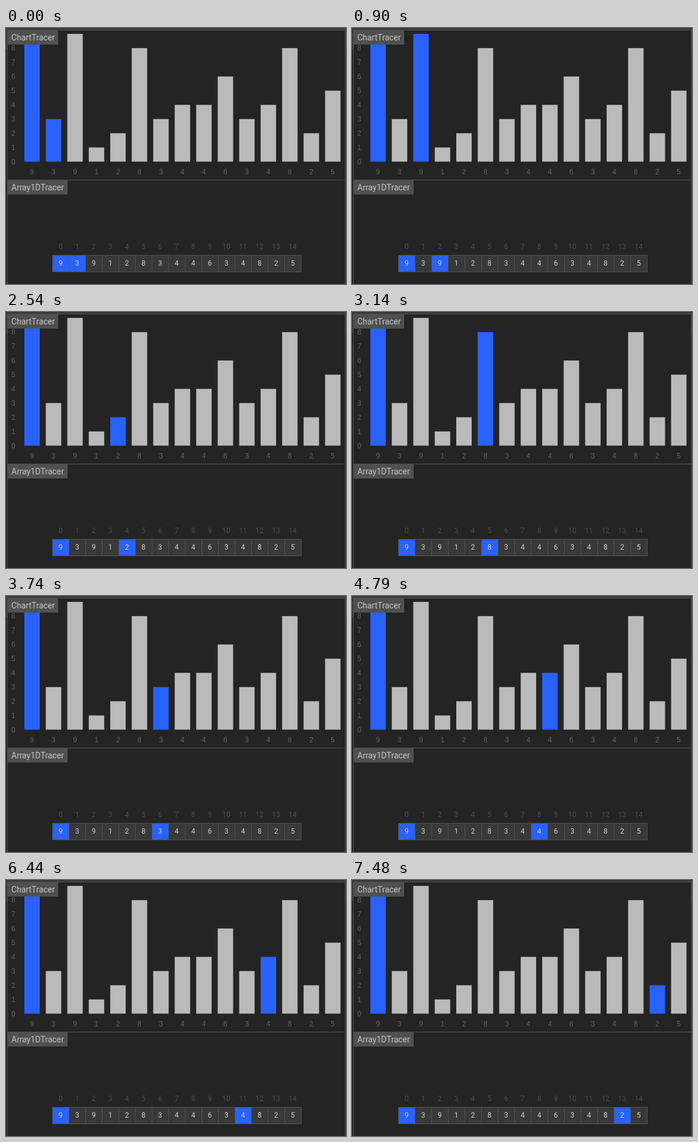
Recreate the animation shown at these times as an HTML page with a canvas. Size 574 px wide and 432 px high, loop 8000 ms.

```html
<!DOCTYPE html>
<html>
<head>
<meta charset="utf-8">
<style>
html, body { margin: 0; width: 574px; height: 432px; overflow: hidden; background: #242424; }
canvas { display: block; }
</style>
</head>
<body>
<canvas id="stage" width="574" height="432"></canvas>
<script>
const ctx = document.getElementById('stage').getContext('2d');
const LOOP = 8000;
const BLUE = '#2962ff', PINK = '#c51162', BAR = '#bababa';
const CELL = '#393939', LINE = '#505050';
const UI = 'Roboto, sans-serif';
const AXIS = '"Liberation Sans", Arial, sans-serif';
const data = [9, 3, 9, 1, 2, 8, 3, 4, 4, 6, 3, 4, 8, 2, 5];

// [start time, compared index, is it a new minimum]
const steps = [
  [0, 1], [450, 1, true], [900, 2], [1500, 3], [2100, 3, true],
  [2540, 4], [3140, 5], [3740, 6], [4190, 7], [4790, 8],
  [5390, 9], [5840, 10], [6440, 11], [7040, 12], [7480, 13]
];

function rect(x, y, w, h, color) {
  ctx.fillStyle = color;
  ctx.fillRect(x, y, w, h);
}

function text(str, x, y, size, color, family, align = 'center') {
  ctx.font = `${size}px ${family}`;
  ctx.textAlign = align;
  ctx.fillStyle = color;
  ctx.fillText(str, x, y);
}

function title(str, y, w) {
  rect(3, y, w, 24, LINE);
  text(str, 9, y + 17, 14, '#c6c6c6', UI, 'left');
}

function drawFrame() {
  rect(0, 0, 574, 432, '#242424');
  rect(0, 0, 574, 3, CELL);
  rect(0, 0, 2, 36, CELL);
  rect(573, 0, 1, 36, CELL);
  rect(2, 3, 571, 1, LINE);
  rect(2, 256, 571, 1, LINE);
  rect(2, 3, 1, 429, LINE);
  rect(572, 3, 1, 429, LINE);
}

function drawChart(tint) {
  for (let v = 0; v < 9; v++) {
    text(v, 9, 229.7 - v * 23.95, 12, '#666', AXIS, 'left');
  }
  data.forEach((v, i) => {
    const x = 30.93 + 36.27 * i, h = v * 23.95;
    rect(x, 225.5 - h, 26.05, h, tint(i) || BAR);
    text(v, x + 13, 246.5, 12, '#666', AXIS);
  });
  title('ChartTracer', 4, 85);
}

function drawArray(tint) {
  rect(78, 383, 421, 29, LINE);
  data.forEach((v, i) => {
    const x = 79 + 28 * i;
    rect(x, 384, 27, 27, tint(i) || CELL);
    text(i, x + 13, 373.3, 12, LINE, UI);
    text(v, x + 13, 401.3, 12, '#d0d0d0', UI);
  });
  title('Array1DTracer', 257, 101);
}

function draw(t) {
  const [, active, isMin] = steps.filter(s => s[0] <= t).pop();
  const tint = i => i === active ? (isMin ? PINK : BLUE) : i === 0 ? BLUE : null;
  drawFrame();
  drawChart(tint);
  drawArray(tint);
}

const start = performance.now();
function tick() {
  draw((performance.now() - start) % LOOP);
  requestAnimationFrame(tick);
}
tick();
</script>
</body>
</html>
```
